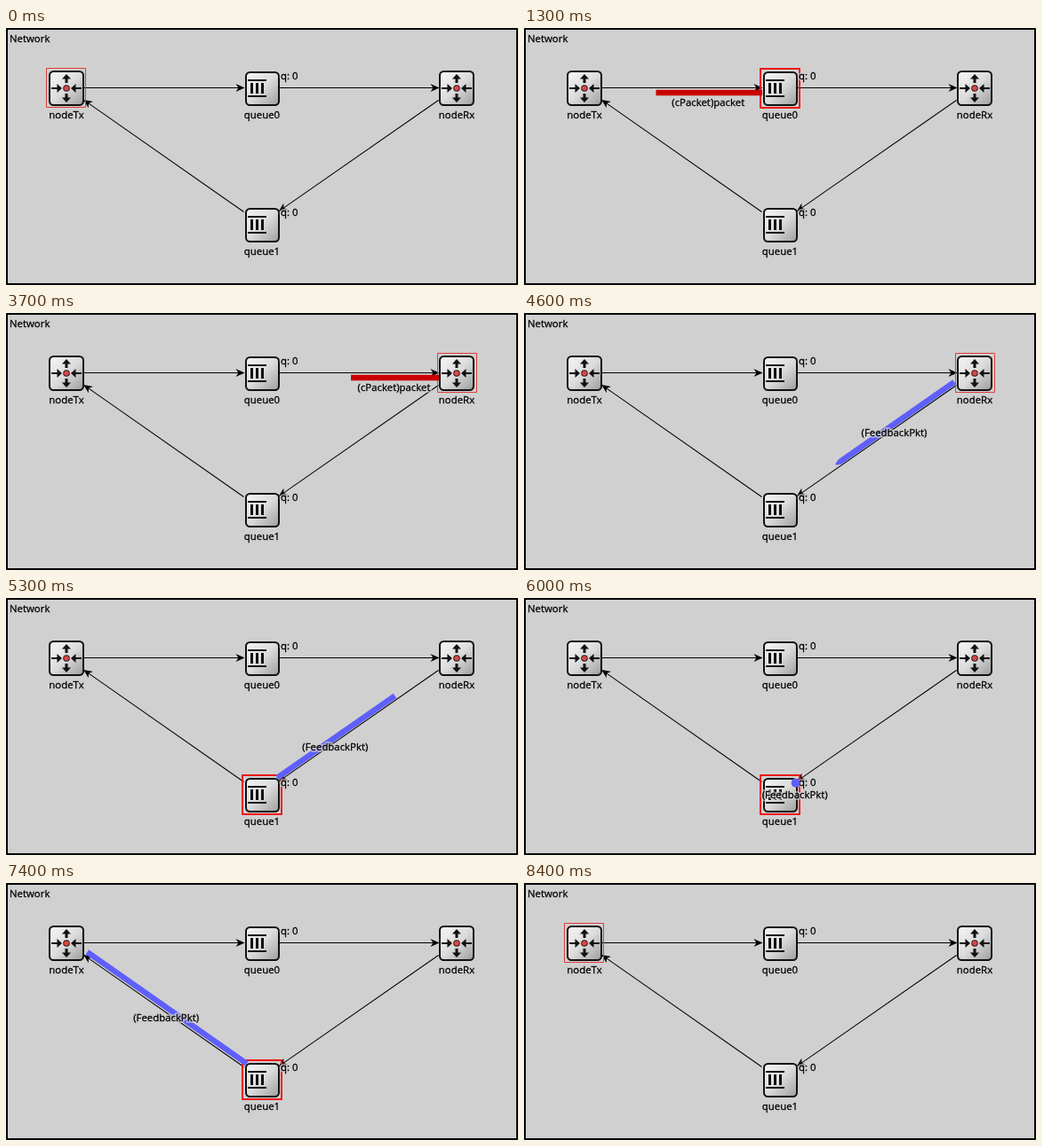
Animation, 576 px wide and 290 px high, one loop 8500 ms. Source, as an HTML page with a canvas:

```html
<!DOCTYPE html>
<html lang="en">
<head>
<meta charset="utf-8">
<title>Packet network</title>
<style>
  html, body { margin: 0; width: 100%; height: 100%; overflow: hidden; background: #d0d0d0; }
  canvas { display: block; width: 576px; height: 290px; }
</style>
</head>
<body>
<canvas id="stage" width="576" height="290"></canvas>
<script>
const ctx = document.getElementById('stage').getContext('2d');
const LOOP = 8500, STEP = 100;
const RED = '#c80000', BLUE = '#5f5ffc', INK = '#111';

const nodes = {
  nodeTx: { x: 68, y: 68 },
  queue0: { x: 288, y: 68, queue: true },
  nodeRx: { x: 507, y: 68 },
  queue1: { x: 288, y: 222, queue: true }
};

// Each link carries one packet: head = [leaves, arrives], tail = [leaves, arrives].
const links = [
  { a: [88, 68], b: [268, 68], color: RED, text: '(cPacket)packet', head: [50, 870], tail: [870, 2150] },
  { a: [307, 68], b: [487, 68], color: RED, text: '(cPacket)packet', head: [2250, 3250], tail: [3250, 4250] },
  { a: [487, 82], b: [308, 207], color: BLUE, text: '(FeedbackPkt)', head: [4250, 4720], tail: [5050, 6010] },
  { a: [268, 208], b: [88.5, 82], color: BLUE, text: '(FeedbackPkt)', head: [6050, 7400], tail: [7450, 8350] }
];

// Highlighted node, from the given time on.
const focus = [[0, 'nodeTx'], [900, 'queue0'], [2200, 'nodeTx'], [3300, 'nodeRx'], [5100, 'queue1'], [7500, 'nodeTx']];

const progress = (t, [from, to]) => Math.min(1, Math.max(0, (t - from) / (to - from)));

function poly(points, color) {
  ctx.fillStyle = color;
  ctx.beginPath();
  points.forEach(([x, y]) => ctx.lineTo(x, y));
  ctx.closePath();
  ctx.fill();
}

function disc(x, y, r, color) {
  ctx.fillStyle = color;
  ctx.beginPath();
  ctx.arc(x, y, r, 0, Math.PI * 2);
  ctx.fill();
}

// Text with a translucent halo in the background colour.
function text(str, x, y, align = 'center') {
  ctx.font = '11.4px "Open Sans", "Noto Sans", sans-serif';
  ctx.textAlign = align;
  ctx.lineJoin = 'round';
  ctx.lineWidth = 4;
  ctx.strokeStyle = 'rgba(208, 208, 208, 0.65)';
  ctx.strokeText(str, x, y);
  ctx.lineWidth = 0.3;
  ctx.strokeStyle = ctx.fillStyle = '#000';
  ctx.fillText(str, x, y);
  ctx.strokeText(str, x, y);
}

// Runs draw with the x axis along the link, starting at its first point.
function along({ a, b }, shift, draw) {
  const dx = b[0] - a[0], dy = b[1] - a[1];
  ctx.save();
  ctx.translate(a[0] + shift, a[1] + shift);
  ctx.rotate(Math.atan2(dy, dx));
  draw(Math.hypot(dx, dy));
  ctx.restore();
}

function drawLink(link) {
  along(link, -0.5, len => {
    ctx.fillStyle = '#000';
    ctx.fillRect(0, -0.5, len - 4, 1);
    poly([[len + 1, 0], [len - 9, -4.5], [len - 6, 0], [len - 9, 4.5]], '#000');
  });
}

function drawRouterGlyph() {
  for (const s of [-1, 1]) {
    // Vertical arrows point out, horizontal ones point in.
    poly([[0, 16 * s], [-5, 10.5 * s], [5, 10.5 * s]], INK);
    ctx.fillRect(-1.5, s < 0 ? -12 : 6, 3, 6);
    poly([[5 * s, 0], [10.5 * s, -5], [10.5 * s, 5]], INK);
    ctx.fillRect(s < 0 ? -17 : 10, -1, 7, 2);
  }
  disc(0, 0, 3.8, '#301818');
  disc(0, 0, 2.8, '#d84848');
}

function drawQueueGlyph() {
  ctx.fillRect(-16, -10, 21, 2);
  ctx.fillRect(-16, 8, 21, 2);
  for (const x of [-13, -7, -1]) ctx.fillRect(x, -6, 3, 12);
}

function drawNode(name, { x, y, queue }) {
  ctx.save();
  ctx.translate(x, y);
  const shade = ctx.createLinearGradient(-17, -17, 17, 17);
  shade.addColorStop(0, '#f4f4f4');
  shade.addColorStop(0.5, '#dcdcdc');
  shade.addColorStop(1, '#a4a4a4');
  const left = queue ? -18 : -19, size = queue ? 37 : 38;
  ctx.beginPath();
  ctx.roundRect(left, left, size, size, 4.5);
  ctx.fillStyle = shade;
  ctx.fill();
  ctx.lineWidth = 2;
  ctx.strokeStyle = INK;
  ctx.stroke();
  ctx.fillStyle = INK;
  if (queue) drawQueueGlyph();
  else drawRouterGlyph();
  ctx.restore();
}

function drawFocus({ x, y, queue }) {
  ctx.lineWidth = queue ? 2 : 1;
  ctx.strokeStyle = queue ? '#ee1414' : '#dc3c3c';
  if (queue) ctx.strokeRect(x - 22, y - 22, 44, 44);
  else ctx.strokeRect(Math.floor(x - 22) + (x > 300 ? 0.5 : -0.5), y - 22.5, 44, 44);
}

function drawPacket(link, t) {
  if (t < link.head[0] || t > link.tail[1]) return;
  const { a, b, color } = link;
  const head = progress(t, link.head), tail = progress(t, link.tail);
  const mid = (head + tail) / 2;
  const dx = b[0] - a[0], dy = b[1] - a[1], len = Math.hypot(dx, dy);
  let x = a[0] + dx * mid, y = a[1] + dy * mid, drop = 15;

  if ((head - tail) * len < 6) {
    // A very short packet is a dot on the line, running on into the node.
    x += dx / len * 4;
    y += dy / len * 4;
    drop = 17;
    disc(x, y, 5, color);
  } else {
    x -= dy / len * 5;
    y += dx / len * 5;
    along(link, 0, () => {
      const from = tail * len, to = head * len;
      const tip = head < 1 ? 6 : 0;
      poly([[from, 1.8], [to - tip, 1.8], [to, tip ? 4 : 1.8], [to, tip ? 6 : 8.2],
            [to - tip, 8.2], [from, 8.2]], color);
    });
  }
  text(link.text, x - 1, y + drop);
}

function draw(t) {
  ctx.fillStyle = '#d0d0d0';
  ctx.fillRect(0, 0, 576, 290);
  text('Network', 4, 16, 'left');
  ctx.lineWidth = 2;
  ctx.strokeStyle = '#000';
  ctx.strokeRect(1, 1, 574, 288);

  for (const name in nodes) drawNode(name, nodes[name]);
  links.forEach(drawLink);
  const active = focus.filter(([from]) => from <= t).pop()[1];
  drawFocus(nodes[active]);

  for (const name in nodes) text(name, nodes[name].x, nodes[name].y + 34);
  text('q: 0', 309, 58, 'left');
  text('q: 0', 309, 212, 'left');
  links.forEach(link => drawPacket(link, t));
}

const start = performance.now();
function tick() {
  const t = (performance.now() - start) % LOOP;
  draw(Math.floor(t / STEP) * STEP);
  requestAnimationFrame(tick);
}
tick();
</script>
</body>
</html>
```
